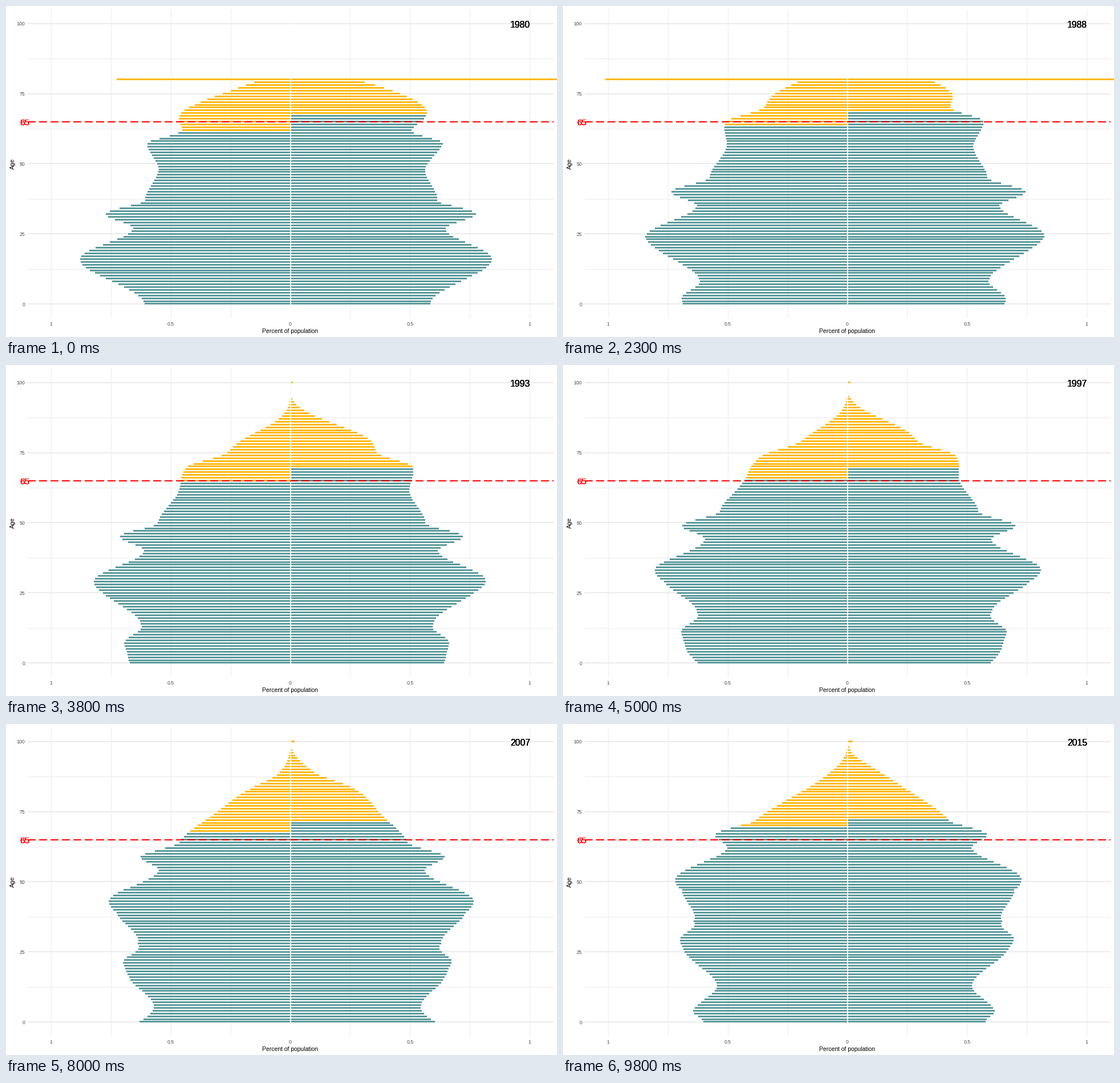
These frames come from a looping animation (966x580 px, 10000 ms). A matplotlib script:

```python
import numpy as np
import matplotlib.pyplot as plt
from matplotlib.animation import FuncAnimation
from matplotlib.collections import PolyCollection

W, H, DPI = 966, 580, 100
PT = 72 / DPI
MID, ROW = 498.5, 4.915
TEAL, GOLD, GRID = "#5B9A9C", "#FFB90F", "#EBEBEB"
AGES = np.arange(101)

# Peaks and dips of cohort size: birth year, bar width in pixels.
TURNS = [(1893, 0), (1914, 196), (1918, 190), (1923, 251), (1932, 231),
         (1943, 255), (1948, 324), (1953, 276), (1964, 369), (1980, 256),
         (1986, 290), (1991, 285), (2002, 246), (2011, 278), (2015, 253)]


def ease(t):
    t = np.clip(t, 0, 1)
    return t * t * (3 - 2 * t)


def cohort(birth):
    """Size of a cohort in 1980, or at birth if that is later."""
    size = np.zeros(len(birth))
    for (b0, w0), (b1, w1) in zip(TURNS, TURNS[1:]):
        size += (w1 - w0) * ease((birth - b0) / (b1 - b0))
    return size


def pyramid(year):
    """Widths of the male and female bars for every age."""
    birth = year - AGES
    start = np.maximum(birth, 1980)
    drift = np.interp(birth, [1968, 1979, 1990, 2005], [-.005, .0015, 0, -.007])
    frailty = .00072 * np.exp(-.022 * (birth - 1923))
    deaths = frailty * (np.exp(.09 * AGES) - np.exp(.09 * (start - birth)))
    men = cohort(birth) * np.exp(drift * (year - start) - deaths)

    # Women outlive men, but the gap closes with the years.
    even_age = 78.7 + .31 * (year - 1980)
    ratio = .957 + .05 * ease((AGES - 16) / 20) + np.exp((AGES - even_age) / 7.6)
    women = men * ratio
    men[100], women[100] = 1, 4.2 + .2 * (year - 1990)

    if year < 1990:  # ages 80 and over form one open group
        men[81:] = women[81:] = 0
        men[80] = np.interp(year, [1980, 1985, 1989], [305, 370, 443])
        women[80] = 900
    return men, women


def retirement(year):
    men = np.interp(year, [1980, 1990, 2015], [62, 64, 70])
    return round(men), round(68 + (year - 1980) / 7)


def year_at(i):
    step = (i + 1) // 3
    return 1980 + step if step <= 27 else round(2007 + (step - 27) * 8 / 6)


plt.rcParams["font.family"] = "Liberation Sans"
fig = plt.figure(figsize=(W / DPI, H / DPI), dpi=DPI, facecolor="white")
ax = fig.add_axes([0, 0, 1, 1])
ax.set(xlim=(0, W), ylim=(H, 0))
ax.axis("off")


def label(x, y, s, px, color, ha="center", va="baseline", **kw):
    return ax.text(x, y, s, fontsize=px * PT, color=color, ha=ha, va=va, **kw)


def line(xs, ys, color, px, z, **kw):
    ax.plot(xs, ys, color=color, lw=px * PT, zorder=z, solid_capstyle="butt", **kw)


for k in range(9):
    x, y = MID + 104.9 * (k - 4), 521.5 - 61.4 * k
    line([x, x], [5, 546], GRID, 1, 1)
    line([38, 960], [y + .5, y + .5], GRID, 2 - k % 2, 1)
    if k % 2 == 0:
        label(x, 556, f"{abs(k - 4) / 4:g}", 8.8, "#4D4D4D", va="center_baseline")
        label(33.5, y + .5, f"{k * 12.5:g}", 8.8, "#4D4D4D", ha="right",
              va="center_baseline")
label(498, 573, "Percent of population", 10.4, "black")
label(11.5, 276, "Age", 10.6, "black", va="center", rotation=90)

bars = PolyCollection([], antialiased=False, linewidths=0, zorder=2)
ax.add_collection(bars, autolim=False)
line([MID, MID], [5, 546], "white", 1.8, 3)
line([38, 960], [203, 203], "red", 2, 4, dashes=(7, 3), dash_capstyle="butt")

# Stacked copies give the heavy look of overprinted text.
for _ in range(4):
    label(33, 209, "65", 15.4, "red", zorder=5)
stamps = [label(901.5, 38, "", 15.7, "black", zorder=5) for _ in range(4)]

top = np.ceil(519.99 - ROW * AGES)


def boxes(left, right):
    xs = np.stack([left, right, right, left], 1)
    ys = np.stack([top, top, top + 3, top + 3], 1)
    return np.stack([xs, ys], 2)


def draw(i):
    year = year_at(i)
    men, women = pyramid(year)
    mid = np.full(len(AGES), MID)
    bars.set_verts(np.concatenate([boxes(MID - men, mid), boxes(mid, MID + women)]))
    bars.set_facecolor([GOLD if a >= limit else TEAL
                        for limit in retirement(year) for a in AGES])
    for s in stamps:
        s.set_text(str(year))
    return [bars, *stamps]


anim = FuncAnimation(fig, draw, frames=100, interval=100, repeat=True,
                     repeat_delay=0, blit=False)
plt.show()
```
